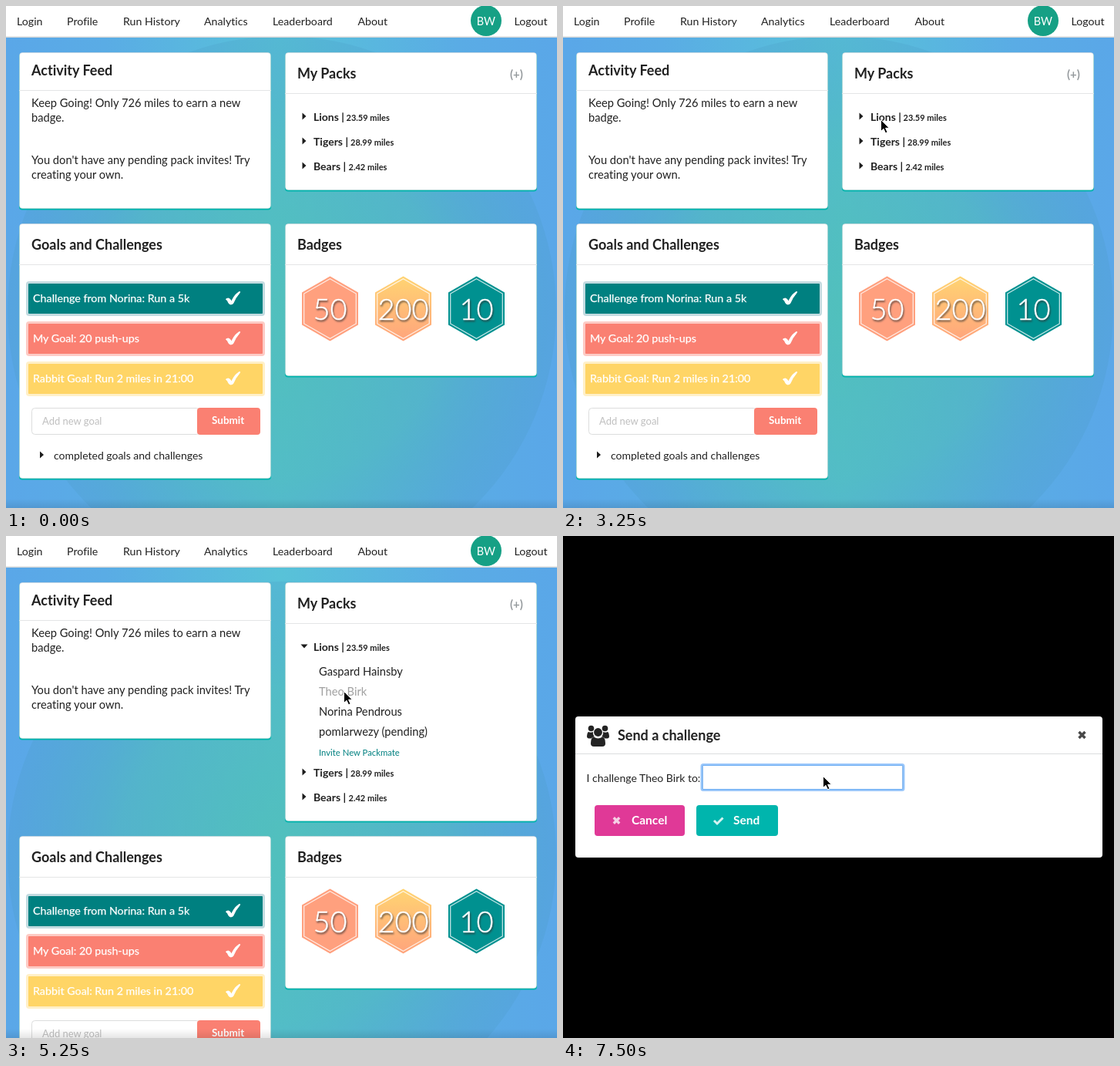
Animation of 715x651 px, one loop 8000 ms. Source, as an HTML page:

```html
<!DOCTYPE html>
<html lang="en">
<head>
<meta charset="utf-8">
<title>Running dashboard</title>
<style>
  html, body { margin: 0; width: 100%; height: 100%; overflow: hidden; background: #000; }
  svg { display: block; }
  text { font-family: Lato, sans-serif; font-size: 14px; fill: #212121; white-space: pre;
         font-variant-ligatures: none; }
  .bold { font-weight: 700; }
  .title { font-size: 18px; font-weight: 700; }
  .body { font-size: 14.7px; }
  .goal { font-size: 14.3px; fill: #fff; stroke: #fff; stroke-width: .25px; }
  .small { font-size: 11px; font-weight: 700; }
  .white { fill: #fff; }
  .link { font-size: 11.3px; fill: #008080; }
  .number { font-size: 38px; font-weight: 300; fill: #fff; stroke: #fff; stroke-width: .5px;
            text-anchor: middle; filter: drop-shadow(1.5px 2px 1px rgba(50, 50, 50, .75)); }
  .hover { fill: #a0a0a0; }
</style>
</head>
<body>
<svg id="stage" width="715" height="651" viewBox="0 0 715 651"></svg>
<script>
const LOOP = 8000;
const MEMBERS = ['Gaspard Hainsby', 'Theo Birk', 'Norina Pendrous', 'pomlarwezy (pending)'];

// time, scene, cursor x, cursor y, hovered member
const STEPS = [
  [0, 'closed'],
  [1500, 'closed', 600, -2],
  [1750, 'closed', 535, 43],
  [2000, 'closed', 453, 115],
  [2250, 'closed', 421, 140],
  [2500, 'closed', 412, 147],
  [3500, 'open', 412, 147],
  [3750, 'open', 407, 149],
  [4250, 'open', 405, 161],
  [4500, 'open', 407, 179, 0],
  [4750, 'open', 425, 192],
  [5000, 'open', 438, 200, 1],
  [5250, 'open', 438, 201, 1],
  [6000, 'loading', 438, 201],
  [6250, 'ready', 438, 201],
  [6500, 'ready', 363, 286],
  [6750, 'ready', 336, 312],
  [7000, 'focused', 337, 311]
];

const text = (x, y, s, cls = '', extra = '') => `<text x="${x}" y="${y}" class="${cls}" ${extra}>${s}</text>`;
const rect = (x, y, w, h, fill, r = 0, extra = '') =>
  `<rect x="${x}" y="${y}" width="${w}" height="${h}" rx="${r}" fill="${fill}" ${extra}/>`;
const path = (d, extra = '') => `<path d="${d}" ${extra}/>`;
const line = (x, y, w) => rect(x, y, w, 1, '#e4e5e6');
const caret = (x, y, down) => path(down ? `M${x - 4.5} ${y - 2.5}h9l-4.5 5z` : `M${x - 2.5} ${y - 4.5}v9l5-4.5z`, 'fill="#1c1c1c"');

const defs = `<defs>
  <linearGradient id="sky">
    <stop stop-color="#5aa7e8"/><stop offset=".18" stop-color="#5aace5"/>
    <stop offset=".5" stop-color="#58c2d8"/>
    <stop offset=".82" stop-color="#5aace5"/><stop offset="1" stop-color="#5aa7e8"/>
  </linearGradient>
  <radialGradient id="disc">
    <stop stop-color="#4dbfae" stop-opacity=".65"/>
    <stop offset=".6" stop-color="#4db8b4" stop-opacity=".5"/>
    <stop offset="1" stop-color="#4a9ac4" stop-opacity=".24"/>
  </radialGradient>
  <linearGradient id="gold" x2="0" y2="1">
    <stop stop-color="#ffd472"/><stop offset="1" stop-color="#ffa47c"/>
  </linearGradient>
  <linearGradient id="shade" x2="0" y2="1">
    <stop stop-opacity="0"/><stop offset="1" stop-opacity=".1"/>
  </linearGradient>
</defs>`;

function card(x, y, h, title, titleY, lineY) {
  return rect(x, y + 1.5, 327, h, '#00b5ad', 4)
    + rect(x + .5, y + .5, 326, h - 1, '#fff', 4, 'stroke="#d4d4d5" stroke-opacity=".5"')
    + text(x + 16, titleY, title, 'title') + line(x, lineY, 327);
}

function nav() {
  const items = [[14, 'Login'], [79, 'Profile'], [152, 'Run History'], [257, 'Analytics'],
    [346, 'Leaderboard'], [456.5, 'About'], [659.5, 'Logout']];
  return rect(0, 0, 715, 40, '#fff') + rect(0, 39.5, 715, 1.5, '#d2d6d8')
    + items.map(([x, s]) => text(x, 25, s, '', 'style="font-size:14.2px"')).join('')
    + '<circle cx="623" cy="19" r="20" fill="#16a085"/>'
    + text(623, 24.5, 'BW', 'white', 'text-anchor="middle" style="font-size:14.5px"');
}

function feed() {
  const lines = [[131, 'Keep Going! Only 726 miles to earn a new'], [150, 'badge.'],
    [205, "You don't have any pending pack invites! Try"], [224, 'creating your own.']];
  return card(17, 60, 203, 'Activity Feed', 90, 109)
    + lines.map(([y, s]) => text(33, y, s, 'body')).join('');
}

function pack(y, name, nameEnd, miles, open) {
  return caret(387, y - 6, open) + text(399, y, `${name} |`, 'bold')
    + text(nameEnd, y, `${miles} miles`, 'small');
}

function packs(open) {
  const drop = open ? 131 : 0;
  const list = MEMBERS.map((name, i) =>
    text(406, 181 + 26 * i, name, 'body', `data-member="${i}"`)).join('');
  return card(362, 60, 179 + drop, 'My Packs', 94, 113)
    + text(654, 94, '(+)', 'bold', 'style="font-size:15px;fill:#959a9d"')
    + pack(149, 'Lions', 441.5, '23.59', open)
    + (open ? list + text(406, 285, 'Invite New Packmate', 'link') : '')
    + pack(181 + drop, 'Tigers', 447, '28.99')
    + pack(213 + drop, 'Bears', 444.5, '2.42');
}

function goal(y, label, fill, border) {
  return rect(26, y, 310, 45, border, 4) + rect(29, y + 3, 304, 39, fill, 1)
    + text(35, y + 27, label, 'goal')
    + path(`M285.500 ${y + 23}q3-2 5 0l2 3q4-9 10-12.500q2 0 1 1q-6 7-9 14.500q-3 2-5 0q-2-4-4-6z`,
      'fill="#fff" stroke="#fff"');
}

function goals() {
  return card(17, 282, 331, 'Goals and Challenges', 316, 335)
    + goal(357, 'Challenge from Norina: Run a 5k', '#008080', '#c3dbe0')
    + goal(409, 'My Goal: 20 push-ups', '#fa8072', '#fdcbc5')
    + goal(461, 'Rabbit Goal: Run 2 miles in 21:00', '#ffd566', '#fff0c8')
    + rect(33.5, 521.5, 218, 34, '#fff', 4, 'stroke="#dcdddd"')
    + text(47, 543, 'Add new goal', '', 'style="font-size:13px;fill:#bfbfbf"')
    + rect(248, 521, 82, 35, '#fa8072', 4)
    + text(267, 541.5, 'Submit', 'bold white', 'style="font-size:13.5px"')
    + caret(46.5, 582) + text(62, 588, 'completed goals and challenges');
}

function badge(x, fill, value) {
  const hex = 'M0-42L36.500-21V21L0 42L-36.500 21V-21Z';
  return `<g transform="translate(${x} 392.500)">` + path(hex, `fill="${fill}"`)
    + path(hex, 'fill="none" stroke="#fff" stroke-opacity=".8" stroke-width="1.300" transform="scale(.925)"')
    + text(0, 14, value, 'number') + '</g>';
}

function badges() {
  return card(362, 282, 198, 'Badges', 316, 335)
    + badge(420.5, '#ffa07e', 50) + badge(515.5, 'url(#gold)', 200) + badge(610.5, '#009190', 10);
}

function page(open) {
  return rect(0, 0, 715, 651, 'url(#sky)')
    + `<circle cx="358" cy="${open ? 415 : 395}" r="356" fill="url(#disc)"/>`
    + nav() + feed() + packs(open)
    + `<g transform="translate(0 ${open ? 107 : 0})">${goals()}${badges()}</g>`
    + rect(0, 639, 715, 12, 'url(#shade)');
}

const cross = (x, y, r, color) =>
  path(`M${x - r} ${y - r}l${2 * r} ${2 * r}m0 ${-2 * r}l${-2 * r} ${2 * r}`, `stroke="${color}" stroke-width="3.400"`);

function people() {
  const head = (x, y, r) => `<circle cx="${x}" cy="${y}" r="${r}"/>`;
  return '<g fill="#232323">' + head(36.5, 249.5, 3.8) + head(54.5, 249.5, 3.8) + head(45.5, 254.5, 5.4)
    + path('M33 254q3 1.500 6 0q-.5 4 2 6q-3 .5-4.500 2.500h-3q-2.500 0-2.500-3q0-4 2-5.500z')
    + path('M58 254q-3 1.500-6 0q.5 4-2 6q3 .5 4.500 2.500h3q2.500 0 2.500-3q0-4-2-5.500z')
    + path('M40 260.500q5.500 4 11 0q4 .5 4 8.500q0 4-4 4h-11q-4 0-4-4q0-8 4-8.500z') + '</g>';
}

function modal({ ready, focused }) {
  const d = ready ? 0 : 1;
  const icons = people() + cross(673.5, 258, 4, '#484848') + cross(69.5, 369, 3.7, '#f6cfe5')
    + path('M196 369l4 4l7.500-7.500', 'fill="none" stroke="#d5f3f1" stroke-width="3"');
  const ring = rect(180, 296.5, 262, 33, 'none', 2, 'stroke="#9cc8fa" stroke-width="3"')
    + rect(181, 297.5, 260, 31, 'none', 1, 'stroke="#69acf3"');
  return rect(0, 0, 715, 651, '#000')
    + rect(16, 234 + d, 684, 183 - d, '#fff', 4)
    + text(71, 264.5 + d, 'Send a challenge', 'title')
    + rect(16, 282 + d, 684, 1, '#dcddde')
    + text(30.5, 318.5 + d, `I challenge ${MEMBERS[1]} to:`)
    + rect(181.5, 297.5 + d, 259, 31, '#fff', 0, 'stroke="#d9d9da"')
    + rect(41, 349 + d, 117, 40 - d, '#e03997', 4)
    + rect(173, 349 + d, 106, 40 - d, '#00b5ad', 4)
    + text(89, 374, 'Cancel', 'bold white', 'style="font-size:15.5px"')
    + text(221, 374, 'Send', 'bold white', 'style="font-size:15.5px"')
    + (ready ? icons : '') + (focused ? ring : '');
}

const scenes = {
  closed: page(false),
  open: page(true),
  loading: modal({}),
  ready: modal({ ready: true }),
  focused: modal({ ready: true, focused: true })
};

const stage = document.getElementById('stage');
stage.innerHTML = defs
  + Object.entries(scenes).map(([id, art]) => `<g id="${id}">${art}</g>`).join('')
  + path('M.5.5V15.500L4 12.300L6.500 17.800L9 16.700L6.600 11.300H11.300Z',
    'id="cursor" fill="#000" stroke="#fff" stroke-linejoin="round"');

const cursor = document.getElementById('cursor');
const members = stage.querySelectorAll('[data-member]');
const layers = Object.keys(scenes).map(id => document.getElementById(id));
const start = performance.now();
let current;

function show(step) {
  const [, scene, x, y, hovered] = step;
  layers.forEach(g => { g.style.display = g.id === scene ? '' : 'none'; });
  members.forEach((el, i) => el.classList.toggle('hover', i === hovered));
  cursor.style.display = x === undefined ? 'none' : '';
  if (x !== undefined) cursor.setAttribute('transform', `translate(${x} ${y})`);
}

function tick() {
  const time = (performance.now() - start) % LOOP;
  const step = STEPS.findLast(s => s[0] <= time) || STEPS[0];
  if (step !== current) show(current = step);
  requestAnimationFrame(tick);
}
tick();
</script>
</body>
</html>
```
